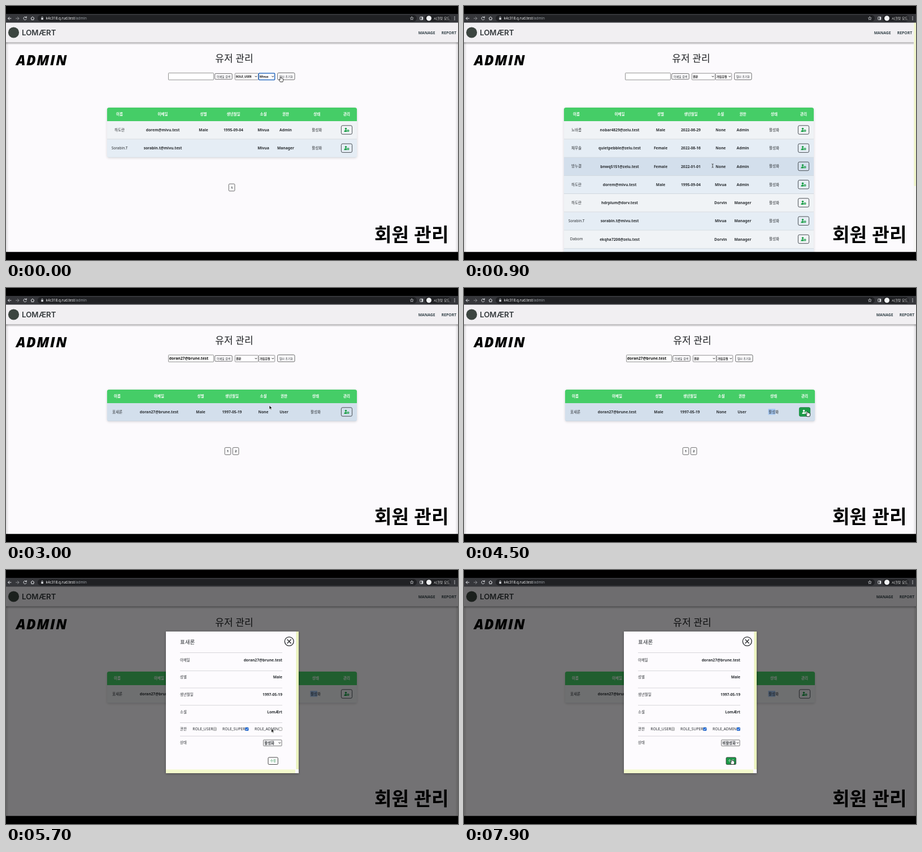
These frames come from a looping animation (800x450 px, 8 s). An HTML page:

```html
<!DOCTYPE html>
<html lang="ko">
<head>
<meta charset="utf-8">
<style>
  html, body { margin: 0; width: 100%; height: 100%; overflow: hidden; background: #000; }
  svg { display: block; width: 800px; height: 450px; }
  text { font-family: 'Noto Sans', 'Noto Sans CJK KR', 'Noto Sans CJK', sans-serif; white-space: pre; }
  .ko { font-family: 'Noto Sans CJK KR', 'Noto Sans CJK', sans-serif; }
</style>
</head>
<body>
<svg id="stage" viewBox="0 0 800 450" xmlns="http://www.w3.org/2000/svg"></svg>
<script>
const LOOP = 8000, STEP = 100;
const INK = '#2b2f33', GREEN = '#45cd67', ROW = 32.25, TOP = 204;
const MAIL = 'doran27@brune.test';

const USERS = [
  ['노바름', 'nobar4829@zelu.test', 'Male', '2022-06-29', 'None', 'Admin'],
  ['채우솔', 'quietpebble@zelu.test', 'Female', '2022-08-16', 'None', 'Admin'],
  ['방누결', 'bnwq5151@zelu.test', 'Female', '2022-01-01', 'None', 'Admin'],
  ['하도란', 'dorem@mivu.test', 'Male', '1995-09-04', 'Mivua', 'Admin'],
  ['하도란', 'hdrplum@dorv.test', '', '', 'Dorvin', 'Manager'],
  ['Sorabin.T', 'sorabin.t@mivu.test', '', '', 'Mivua', 'Manager'],
  ['Dabom', 'ekqha7206@zelu.test', '', '', 'Dorvin', 'Manager'],
  ['', '', '', '', '', '']
];
const FOUND = ['표새론', MAIL, 'Male', '1997-05-19', 'None', 'User'];
const HEADS = ['이름', '이메일', '성별', '생년월일', '소셜', '권한', '상태', '관리'];

// y is the vertical middle of the line
const text = (x, y, s, size = 6.7, { w = 400, a = 'start', c = INK, more = '' } = {}) =>
  `<text x="${x}" y="${y + size * .36}" font-size="${size}" font-weight="${w}" text-anchor="${a}" fill="${c}" ${more}>${s}</text>`;
const mid = (x, y, s, size, o) => text(x, y, s, size, { ...o, a: 'middle' });
const rect = (x, y, w, h, fill, more = '') =>
  `<rect x="${x}" y="${y}" width="${w}" height="${h}" fill="${fill}" ${more}/>`;
const box = (x, y, w, h, r = 1.5, stroke = '#444', sw = .8, fill = '#fefdff', more = '') =>
  rect(x, y, w, h, fill, `rx="${r}" stroke="${stroke}" stroke-width="${sw}" ${more}`);
const path = (d, stroke, sw = 1, more = '') =>
  `<path d="${d}" fill="none" stroke="${stroke}" stroke-width="${sw}" stroke-linecap="round" stroke-linejoin="round" ${more}/>`;
const group = (id, body) => `<g id="${id}">${body}</g>`;
const chevron = (x, y) => path(`M${x - 1.5} ${y - .8}l1.5 1.6 1.5-1.6`, '#222', 1);

function userIcon(x, y, c) {
  return `<g transform="translate(${x} ${y})" fill="${c}"><circle cx="-1.5" cy="-2" r="1.8"/>
    <path d="M-4.6 3.4q0-3.3 3-3.3q1.5 0 2 .6q-.7 1.4.2 2.7z"/>
    <circle cx="2.5" cy="1.4" r="1.4" fill="none" stroke="${c}" stroke-width="1.2"/></g>`;
}

function chrome() {
  const c = '#dfe1e5';
  return rect(0, 0, 800, 29, '#000') + rect(0, 14, 800, 15.5, '#35363a') +
    rect(56, 16, 671, 11.5, '#202124', 'rx="5.7"') +
    path('M9 22H3.6M6 19.5L3.6 22 6 24.500', c) +
    path('M17.500 22H23M20.500 19.500L23 22 20.500 24.500', '#8b8d91') +
    path('M35.800 20.200A2.700 2.700 0 1 0 36.200 23M36.400 18.800V20.700H34.500', c) +
    path('M44 21.700L47 19l3 2.700M45 21.500V24.500H49V21.500', c) +
    rect(62.3, 21.2, 3.6, 3, c) + path('M63 21v-1a1.1 1.1 0 0 1 2.200 0v1', c, .7) +
    text(70.5, 21.7, 'k4c318.q.rud.test<tspan fill="#9aa0a6">/admin</tspan>', 6.3, { c: '#f1f3f4' }) +
    path('M718.300 19l.9 1.900 2 .2-1.500 1.400.4 2-1.800-1-1.800 1 .4-2-1.500-1.400 2-.2z', c, .7) +
    box(732.8, 19.3, 5, 5, .5, c, .9, 'none') + rect(735.6, 19.3, 2.2, 5, c) +
    rect(741, 16, 46, 11.5, '#202124', 'rx="5.7"') +
    '<circle cx="748.5" cy="21.800" r="4.500" fill="#f1f3f4"/>' +
    text(757, 21.7, '시크릿 모드', 5.9, { c: '#fff', more: 'class="ko"' }) +
    [19.3, 21.8, 24.3].map(y => `<circle cx="794" cy="${y}" r=".8" fill="${c}"/>`).join('');
}

function table(x, cols, rows, id) {
  const h = rows.length * ROW;
  let s = rect(x, 181, 442.5, 24 + h, '#000', 'rx="4" opacity=".13" filter="url(#soft)"');
  s += `<clipPath id="clip-${id}">${rect(x, 180, 442.5, 24 + h, '#fff', 'rx="4"')}</clipPath><g clip-path="url(#clip-${id})">`;
  s += rect(x, 180, 442.5, 24, GREEN);
  rows.forEach((_, i) => {
    const y = TOP + i * ROW;
    s += rect(x, y, 442.5, ROW, i % 2 ? '#e5edf5' : '#f0f3f6', `class="row"`) +
      rect(x, y + ROW - .7, 442.5, .7, '#c9cfd5');
  });
  s += '</g>' + HEADS.map((t, i) => mid(cols[i], 192, t, 6.5, { w: 700, c: '#fff' })).join('');
  rows.forEach((r, i) => {
    const y = 219.6 + i * ROW;
    if (id == 'hit') s += rect(538.5, 214, 12.5, 10.5, '#a5c8f3', 'id="picked"');
    r.forEach((t, k) => s += mid(cols[k], y, t, k ? 6.7 : 6.6, { w: k ? 600 : 400 }));
    s += mid(cols[6], y, '활성화', 6.6) +
      box(cols[7] - 9.6, y - 7.8, 19.2, 15.4, 2.4, '#3a3f44', .9, 'none') + userIcon(cols[7], y, '#1d9f49');
  });
  return s;
}

function page(id, dx, cols, rows, pager, role, social) {
  const o = { w: 600, c: '#35434a' };
  let s = mid(402 + dx, 93, '유저 관리', 17, { w: 500, c: '#1d1f22', more: 'class="ko"' }) +
    text(725.7 + dx * 2, 47.7, 'MANAGE', 6.8, o) + text(766.7 + dx * 2, 47.7, 'REPORT', 6.8, o) +
    box(285.5 + dx, 118.7, 80, 12.2, .8, '#767676', .8, '#fff', `id="in-${id}"`) +
    text(286.7 + dx, 125, id == 'hit' ? MAIL : '', 6.8, { w: 600, c: '#111', more: `id="q-${id}"` }) +
    box(367.7 + dx, 119.7, 30.5, 10.2) + mid(383 + dx, 124.9, '이메일 검색', 5) +
    box(403.3 + dx, 119.2, 41, 11.6, 1, '#767676') + text(405 + dx, 125, role, 5, { w: 600, c: '#111' }) + chevron(440.5 + dx, 125) +
    box(445.3 + dx, 119.2, 28.4, 11.6, 1, id == 'few' ? '#0b57b7' : '#767676', id == 'few' ? 1.3 : .8) +
    text(447 + dx, 125, social, 5, { w: 600, c: '#111' }) + chevron(470.3 + dx, 125) +
    box(478.7 + dx, 118.5, 30.3, 12.2, 1.8) + mid(493.8 + dx, 124.8, '필터 초기화', 5) +
    table(176.7 + dx, cols, rows, id);
  pager.forEach(([x, y, n]) => s += box(x - 5.3, y - 6.3, 10.6, 12.6, 1.6) + mid(x, y, n, 6, { w: 600 }));
  if (id == 'all') s += rect(796, 29, 4, 407, '#f7f6f5') + rect(796.5, 29, 3.5, 290, '#eff4c8', 'rx="1.5"');
  return group(id, s);
}

function check(x, id) {
  return group(id, rect(x, 279, 5.8, 5.8, '#1a66d8', 'rx="1"') + path(`M${x + 1.3} 282l1.200 1.300 2.100-2.800`, '#fff', .9));
}

function modal() {
  const value = (y, k, v) => text(308, y, k, 6.4) + text(489, y, v, 6.7, { w: 600, a: 'end' });
  const role = (x, cx, t) => text(x, 282, t, 6.7, { w: 500 }) + box(cx, 279, 5.5, 5.5, 1, '#767676', .7, '#fff');
  return rect(0, 29, 800, 407, '#000', 'opacity=".54"') +
    rect(283, 110, 235, 251, '#000', 'opacity=".35" filter="url(#soft)"') + rect(283, 109, 235, 251, '#fdfbfe') +
    rect(513.5, 109, 4.5, 244, '#eaf2bd') + rect(283, 353.5, 229, 6.5, '#f3f9cc') +
    text(308, 128, '표새론', 9.5, { more: 'class="ko"' }) +
    '<circle cx="501.200" cy="126.500" r="7.900" fill="none" stroke="#25282b" stroke-width="1.300"/>' +
    path('M498 123.300l6.400 6.400m0-6.400l-6.400 6.400', '#25282b', 1.3) +
    [146, 178.3, 208.6, 239.3, 270, 293.8].map(y => rect(308, y, 181, .8, '#cfced2')).join('') +
    value(159.7, '이메일', MAIL) + value(190, '성별', 'Male') + value(220.8, '생년월일', '1997-05-19') +
    value(251.5, '소셜', 'LomÆrt') + text(308, 282, '권한', 6.4) + text(308, 306, '상태', 6.4) +
    role(330.3, 367, 'ROLE_USER') + rect(367, 279, 5.5, 5.5, '#c9c9cb', 'rx="1"') +
    role(383, 423.5, 'ROLE_SUPER') + role(440, 483, 'ROLE_ADMIN') + check(423.4, 'super') + check(482.9, 'admin') +
    box(455.5, 301, 32.5, 10.7, 1, '#555') + text(457.3, 306.4, '', 6.4, { w: 700, more: 'id="state"' }) + chevron(484.3, 306.4) +
    box(464, 332, 17.3, 12.5, 1.6, '#333', .9, '#fefdff', 'id="save"') + mid(472.7, 338.2, '수정', 5.4, { c: '#27904a', w: 500, more: 'id="saveText"' }) +
    group('menu', box(451.5, 298.5, 41.5, 27.5, 4, '#77777a', .6, '#4a4a4d') + rect(453.5, 312.3, 37.5, 10.2, '#3f6fd8', 'rx="2" id="pick"') +
      path('M456.300 307l1.200 1.400 2-3', '#fff', .9) + text(462, 306.4, '활성화', 6.4, { c: '#fff', w: 500 }) +
      text(462, 317.3, '비활성화', 6.4, { c: '#fff', w: 500 }));
}

const HAND = 'M0 0q-1-.2-1 .8v4l-1-.8q-1 0-.7 1l2 3.500h4.500l.8-3V3q-.4-.8-1.200-.4-.4-.7-1.300-.4-.4-.6-1.200-.3V.8Q1 0 0 0z';
const cursors = () =>
  group('arrow', '<path d="M0 0v7l1.700-1.500 1.100 2.600 1.200-.5-1.100-2.500h2.200z" fill="#111" stroke="#fff" stroke-width=".6"/>') +
  group('hand', `<path d="${HAND}" fill="#fff" stroke="#111" stroke-width=".8"/>`) +
  group('beam', path('M-1.200-3.200q1.200 0 1.200.7v5q0 .7-1.200.7M1.200-3.200q-1.200 0-1.200.7M0 2.500q0 .7 1.200.7', '#222', .8));

const colsFew = [201, 277.5, 349.5, 402.5, 455.5, 495, 550.3, 603];
const colsAll = [199, 275.5, 348, 401.5, 454.3, 493.5, 549, 601];
const colsHit = [197, 271, 344.5, 400, 455.5, 492, 548, 603];

stage.innerHTML = `<defs><filter id="soft" x="-10%" y="-10%" width="120%" height="120%"><feGaussianBlur stdDeviation="2"/></filter>
  <linearGradient id="edge"><stop stop-opacity=".13"/><stop offset="1" stop-opacity="0"/></linearGradient>
  <linearGradient id="drop" x2="0" y2="1"><stop stop-opacity=".32"/><stop offset="1" stop-opacity="0"/></linearGradient></defs>` +
  rect(0, 29, 800, 407, '#fcfafd') + rect(0, 64, 5, 372, 'url(#edge)') +
  rect(0, 64, 5, 372, 'url(#edge)', 'transform="translate(800) scale(-1 1)"') +
  rect(0, 29, 800, 35.3, '#f1eff2') + rect(0, 64.3, 800, 4.5, 'url(#drop)') +
  '<circle cx="13.500" cy="47" r="9.600" fill="#3c4540"/>' +
  text(28, 47, 'LOMÆRT', 13.3, { w: 600, c: '#33383b', more: 'style="font-family:Inter,sans-serif"' }) +
  page('few', 2, colsFew, [USERS[3], USERS[5]], [[399.6, 321.5, 1]], 'ROLE_USER', 'Mivua') +
  page('all', 0, colsAll, USERS, [], '권한', '가입유형') +
  page('hit', 2, colsHit, [FOUND], [[392.5, 289, 1], [406.6, 289, 2]], '권한', '가입유형') +
  group('manage', rect(593, 211.500, 20, 16, '#1c9a48', 'rx="2.4"') + userIcon(603, 219.6, '#fff')) +
  group('modal', modal()) +
  text(18, 95.7, 'ADMIN', 24.5, { w: 800, c: '#000', more: `style="font-family:'Open Sans',sans-serif;font-style:italic;letter-spacing:1.5px"` }) +
  text(652, 405, '회원 관리', 33.2, { w: 900, c: '#000', more: 'class="ko"' }) +
  chrome() + rect(0, 435.7, 800, 14.3, '#000') + group('cursor', cursors());

const $ = id => document.getElementById(id);
const show = (id, on) => $(id).style.display = on ? '' : 'none';

// time, x, y, cursor shape from that time on
const MOVES = [
  [0, 486, 126, 'hand'], [200, 485, 131, 'arrow'], [500, 437, 280, 'beam'], [900, 440, 283, 'beam'],
  [1200, 330, 126, 'beam'], [1600, 330, 126, 'arrow'], [1800, 378, 124, 'hand'], [2100, 378, 124, 'arrow'],
  [3000, 466, 208, 'arrow'], [3600, 539, 219, 'beam'], [3900, 551, 219, 'arrow'], [4300, 605, 220, 'hand'],
  [4600, 609, 219, 'arrow'], [4800, 609, 219, 'arrow'], [5200, 426, 281, 'arrow'], [5500, 426, 281, 'arrow'],
  [5800, 485, 281, 'arrow'], [6000, 485, 281, 'arrow'], [6300, 472, 306, 'arrow'], [6400, 472, 306, 'arrow'],
  [6600, 478, 317, 'arrow'], [6900, 478, 317, 'arrow'], [7300, 474, 336, 'hand'], [LOOP, 474, 336, 'hand']
];

function pointer(t) {
  const i = MOVES.findIndex(m => m[0] > t) - 1;
  const [t0, x0, y0, kind] = MOVES[i], [t1, x1, y1] = MOVES[i + 1];
  const p = (t - t0) / (t1 - t0), e = p * p * (3 - 2 * p);
  return { x: x0 + (x1 - x0) * e, y: y0 + (y1 - y0) * e, kind };
}

function draw(t) {
  const scene = t < 200 ? 'few' : t < 2100 ? 'all' : 'hit';
  const { x, y, kind } = pointer(t);
  const open = Math.max(0, Math.min(1, (t - 4500) / 200));

  for (const id of ['few', 'all', 'hit']) show(id, id == scene);
  const over = open || x < 177 || x > 620 ? -1 : Math.floor((y - TOP) / ROW);
  $(scene).querySelectorAll('.row').forEach((r, i) =>
    r.setAttribute('fill', i == over ? '#d3dfec' : i % 2 ? '#e5edf5' : '#f0f3f6'));

  const focus = t >= 1200;
  const typed = MAIL.slice(0, Math.max(0, Math.floor((t - 1200) / 400 * MAIL.length)));
  $('q-all').innerHTML = typed + (focus ? '<tspan font-weight="400" dx="-.5">|</tspan>' : '');
  $('in-all').setAttribute('stroke', focus ? '#0b57b7' : '#767676');
  $('in-all').setAttribute('stroke-width', focus ? 1.4 : .8);

  show('picked', t >= 3800);
  show('manage', t >= 4200 && t < 4900);
  show('modal', open);
  $('modal').setAttribute('opacity', open);
  show('super', t >= 5400);
  show('admin', t >= 5900);
  show('menu', t >= 6400 && t < 6900);
  show('pick', t >= 6600);
  $('state').textContent = t < 6900 ? '활성화' : '비활성화';
  const hot = t >= 7300;
  $('save').setAttribute('fill', hot ? '#1c9a48' : '#fefdff');
  $('saveText').setAttribute('fill', hot ? '#fff' : '#27904a');

  for (const id of ['arrow', 'hand', 'beam']) show(id, id == kind);
  $('cursor').setAttribute('transform', `translate(${x} ${y})`);
}

function tick() {
  draw(Math.floor(performance.now() % LOOP / STEP) * STEP);
  requestAnimationFrame(tick);
}
tick();
</script>
</body>
</html>
```
